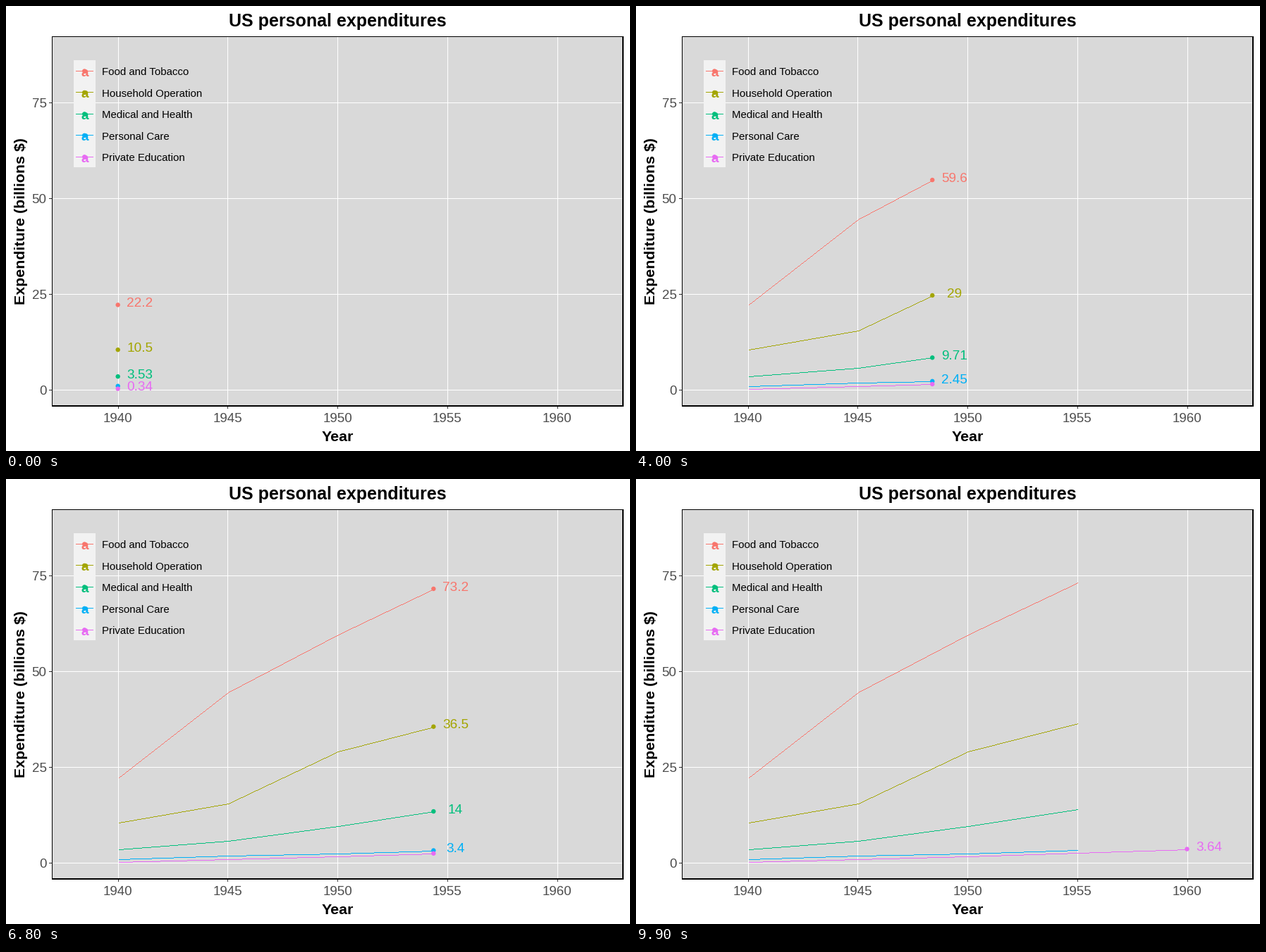
A matplotlib script for the animation above (10000 ms loop, 885 px wide and 632 px high).

```python
import numpy as np
import matplotlib.pyplot as plt
from matplotlib.animation import FuncAnimation
from matplotlib.patches import Circle, Rectangle

W, H, DPI = 885, 632, 64
PT = 72 / DPI  # points per pixel
FRAMES, INTERVAL = 100, 100

YEARS = np.arange(1940, 1961, 5)
STOPS = [0, 25, 50, 74, 99]  # frame at which each year is reached
SERIES = [
    ("Food and Tobacco", "#F8766D", [22.2, 44.5, 59.6, 73.2, 86.8]),
    ("Household Operation", "#A3A500", [10.5, 15.5, 29.0, 36.5, 46.2]),
    ("Medical and Health", "#00BF7D", [3.53, 5.76, 9.71, 14.0, 21.1]),
    ("Personal Care", "#00B0F6", [1.04, 1.98, 2.45, 3.40, 5.40]),
    ("Private Education", "#E76BF3", [0.341, 0.974, 1.80, 2.60, 3.64]),
]
LEFT, TOP, RIGHT, BOTTOM = 65, 43, 875, 567
LABEL_HEIGHT = 14
DOT = 3.2

plt.rcParams["font.family"] = "Liberation Sans"


def px(year):
    return 158.7 + 31.14 * (np.asarray(year) - 1940)


def py(value):
    return 545.4 - 5.447 * np.asarray(value)


fig = plt.figure(figsize=(W / DPI, H / DPI), dpi=DPI, facecolor="white")
ax = fig.add_axes([0, 0, 1, 1])
ax.set_xlim(0, W)
ax.set_ylim(H, 0)
ax.axis("off")


def box(x, y, w, h, color, z=1):
    ax.add_patch(Rectangle((x, y), w, h, fc=color, lw=0, zorder=z))


def text(x, y, s, size, color="black", ha="center", z=6, **kw):
    return ax.text(x, y, s, fontsize=size * PT, color=color, ha=ha,
                   va="baseline", zorder=z, **kw)


def dot(x, y, color, z):
    return ax.add_patch(Circle((x, y), DOT, fc=color, lw=0, zorder=z))


def draw_panel():
    box(LEFT, TOP, RIGHT - LEFT, BOTTOM - TOP, "#D9D9D9")
    for year in YEARS:
        x = round(float(px(year)))
        box(x, TOP, 1, BOTTOM - TOP, "white")
        box(x, BOTTOM + 1, 1, 4, "#333333")
        text(px(year), 591, str(year), 18.8, "#4D4D4D")
    for value in (0, 25, 50, 75):
        y = round(float(py(value)))
        box(LEFT, y, RIGHT - LEFT, 1, "white")
        box(LEFT - 4, y, 4, 1, "#333333")
        text(57.5, y + 7, str(value), 18.8, "#4D4D4D", ha="right")
    box(LEFT, TOP, 1, BOTTOM - TOP, "black", 2)
    box(LEFT, TOP, RIGHT - LEFT, 1, "black", 2)
    box(RIGHT - 1, TOP, 2, BOTTOM - TOP + 2, "black", 2)
    box(LEFT, BOTTOM, RIGHT - LEFT, 2, "black", 2)
    text(470, 29, "US personal expenditures", 25, weight="bold")
    text(470, 618, "Year", 21.33, weight="bold")
    text(27, 305.5, "Expenditure (billions $)", 21.33, weight="bold",
         rotation=90, rotation_mode="anchor")


def draw_legend():
    box(96, 77, 30.5, 152, "#F2F2F2", 7)
    for k, (name, color, _) in enumerate(SERIES):
        y = 92.5 + 30.45 * k
        box(99, round(y - 0.5), 25, 1, color, 8)
        dot(111.3, y, color, 8)
        text(111.3, round(y + 7.3), "a", 19, color, z=9, weight="bold")
        text(136, round(y + 6), name, 15, ha="left", z=9)


draw_panel()
draw_legend()
lines, dots, labels = [], [], []
for _, color, _ in SERIES:
    lines.append(ax.plot([], [], ",", color=color, zorder=3)[0])
    dots.append(dot(0, 0, color, 4))
    labels.append(text(0, 0, "", 19, color, z=5))


def ease(p):
    return 2 * p * p if p < 0.5 else 1 - 2 * (1 - p) ** 2


def hard_line(xs, ys):
    """One pixel per column along a polyline, without smoothing."""
    xs, ys = np.round(xs), np.round(ys)
    cols = np.arange(xs[0], xs[-1])
    return cols + 0.5, np.round(np.interp(cols, xs, ys)) + 0.5


def update(i):
    seg = min(int(np.searchsorted(STOPS, i, side="right")) - 1, 3)
    p = ease((i - STOPS[seg]) / (STOPS[seg + 1] - STOPS[seg]))
    year = YEARS[seg] + 5 * p
    last = i == FRAMES - 1
    placed = []
    for k, (_, _, data) in enumerate(SERIES):
        alive = not last or k == len(SERIES) - 1
        value = data[seg] + p * (data[seg + 1] - data[seg])
        xs, ys = list(YEARS[:seg + 1]), data[:seg + 1]
        if alive:
            xs, ys = xs + [year], ys + [value]
        lines[k].set_data(*hard_line(px(xs), py(ys)))

        x, y = float(px(year)), float(py(value))
        dots[k].center = x, y
        dots[k].set_visible(alive)

        # a label gives way to any label already placed
        free = alive and all(abs(y - q) >= LABEL_HEIGHT for q in placed)
        if free:
            placed.append(y)
        labels[k].set_visible(free)
        labels[k].set_text(f"{round(data[seg + (p >= 0.5)], 2):g}")
        labels[k].set_position((float(px(year + 1)), round(y + 2.7)))
    return lines + dots + labels


anim = FuncAnimation(fig, update, frames=FRAMES, interval=INTERVAL,
                     init_func=lambda: update(0), repeat=True, repeat_delay=0)
plt.show()
```
